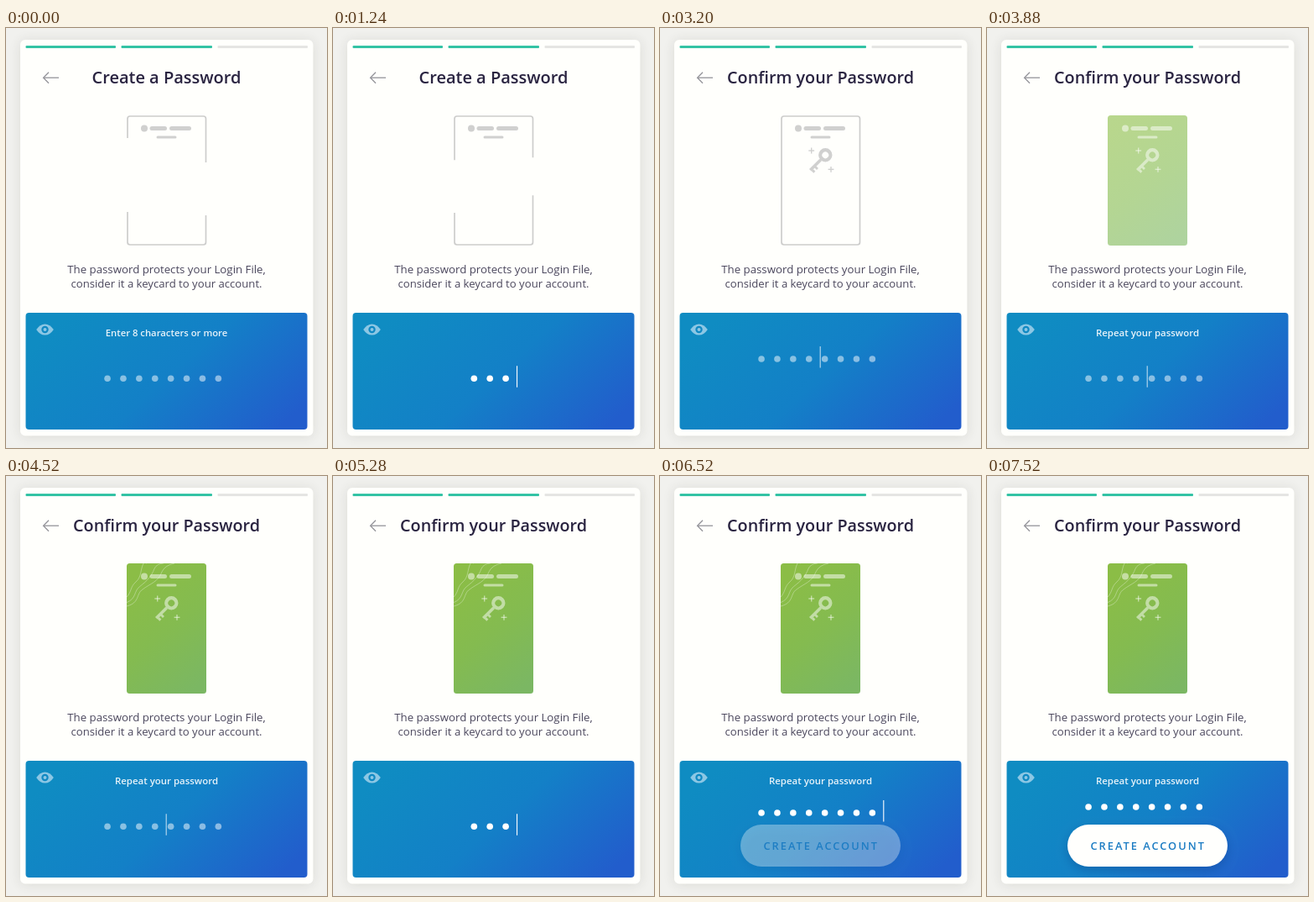
An HTML page with a canvas that plays this animation: 383x500 px, repeating every 7560 ms.

```html
<!DOCTYPE html>
<html lang="en">
<head>
<meta charset="utf-8">
<title>Create a Password</title>
<style>
html, body { margin: 0; width: 100%; height: 100%; overflow: hidden; background: #f1f1ee; }
canvas { display: block; width: 383px; height: 500px; }
</style>
</head>
<body>
<canvas id="stage"></canvas>
<script>
const W = 383, H = 500, LOOP = 7560;
const FONT = '"Open Sans", "Noto Sans", sans-serif';
const KEY_GAP = 215, DOTS = 8;
const ROUND_ONE = 650, ROUND_TWO = 4720, SWAP = 3020;

const canvas = document.getElementById('stage');
const c = canvas.getContext('2d');
const dpr = window.devicePixelRatio || 1;
canvas.width = W * dpr;
canvas.height = H * dpr;

const lerp = (a, b, p) => a + (b - a) * p;
function ease(t, from, to) {
  const u = Math.min(1, Math.max(0, (t - from) / (to - from)));
  return u * u * (3 - 2 * u);
}
// Sum of eased key presses, from 0 to 8
function presses(t, start, dur) {
  let n = 0;
  for (let i = 0; i < DOTS; i++) n += ease(t, start + i * KEY_GAP, start + i * KEY_GAP + dur);
  return n;
}

function withAlpha(a, draw) {
  if (a <= 0) return;
  c.save();
  c.globalAlpha *= a;
  draw();
  c.restore();
}
function box(x, y, w, h, r, fill) {
  c.beginPath();
  c.roundRect(x, y, w, h, r);
  c.fillStyle = fill;
  c.fill();
}
function disc(x, y, r, fill) {
  c.beginPath();
  c.arc(x, y, r, 0, Math.PI * 2);
  c.fillStyle = fill;
  c.fill();
}
function line(points, color, width) {
  c.beginPath();
  points.forEach(([x, y], i) => i ? c.lineTo(x, y) : c.moveTo(x, y));
  c.strokeStyle = color;
  c.lineWidth = width;
  c.stroke();
}
function text(str, x, y, size, weight, color, spacing = 0) {
  c.font = `${weight} ${size}px ${FONT}`;
  c.letterSpacing = spacing + 'px';
  c.textAlign = 'center';
  c.fillStyle = color;
  c.fillText(str, x, y);
  c.letterSpacing = '0px';
}
function gradient(x0, y0, x1, y1, ...colors) {
  const g = c.createLinearGradient(x0, y0, x1, y1);
  colors.forEach((col, i) => g.addColorStop(i / (colors.length - 1), col));
  return g;
}
function shadow(color, blur, dy) {
  c.shadowColor = color;
  c.shadowBlur = blur * dpr;
  c.shadowOffsetY = dy * dpr;
}

function drawCard() {
  c.fillStyle = '#f1f1ee';
  c.fillRect(0, 0, W, H);
  c.save();
  shadow('rgba(60,60,50,.13)', 14, 1);
  box(17, 14, 349.5, 471.5, 6, '#fffffc');
  c.restore();
  box(23.5, 21, 107.5, 3, 1, '#34c3a5');
  box(137.5, 21, 108.5, 3, 1, '#34c3a5');
  box(252.5, 21, 107.5, 3, 1, '#e5e5e3');
  line([[63, 59.2], [45, 59.2]], '#94949a', 1.3);
  line([[51, 52.7], [44.6, 59.2], [51, 65.7]], '#94949a', 1.3);
}

function drawTitle(t) {
  const ink = '#2a2441';
  withAlpha(1 - ease(t, 2800, 2950), () => text('Create a Password', 191.5, 66.3, 20, 600, ink));
  withAlpha(ease(t, 2950, 3120), () => text('Confirm your Password', 191.5, 66.3, 19.8, 600, ink));
  text('The password protects your Login File,', 191.5, 292.3, 13.25, 400, '#4b475d');
  text('consider it a keycard to your account.', 191.5, 309.3, 13.15, 400, '#4b475d');
}

function drawOutline(t) {
  const p = presses(t, ROUND_ONE, 420) / DOTS;
  const L = 145, R = 238.5, T = 105, B = 258, r = 3;
  c.strokeStyle = '#cdcdcc';
  c.lineWidth = 1.7;
  c.beginPath();
  c.moveTo(R, lerp(160, 140, p));
  c.arcTo(R, T, L, T, r);
  c.arcTo(L, T, L, B, r);
  c.lineTo(L, lerp(131, 222.5, p));
  c.moveTo(L, lerp(219, 222.5, p));
  c.arcTo(L, B, R, B, r);
  c.arcTo(R, B, R, T, r);
  c.lineTo(R, lerp(223, 140, p));
  c.stroke();
}

function drawHeader(color) {
  disc(165, 119.4, 4, color);
  box(171.5, 117, 20.5, 5, 2.5, color);
  box(195, 117, 26, 5, 2.5, color);
  box(179.5, 128.4, 24, 3, 1.5, color);
}

function drawSpark(x, y, s, color) {
  if (s <= 0) return;
  line([[x - s, y], [x + s, y]], color, 1.4);
  line([[x, y - s], [x, y + s]], color, 1.4);
}

function drawKey(t, color) {
  withAlpha(ease(t, 2370, 2590), () => {
    c.save();
    c.translate(197.3, 151.3);
    c.rotate(Math.PI * 0.75);
    c.fillStyle = color;
    c.beginPath();
    c.arc(0, 0, 8.2, 0, Math.PI * 2);
    c.arc(0, 0, 3.9, 0, Math.PI * 2, true);
    c.rect(8, -1.8, 17.5, 3.6);
    c.rect(17, -5.2, 2.8, 3.4);
    c.rect(22, -5.2, 3, 3.4);
    c.fill();
    c.restore();
  });
  const s = 3.4 * ease(t, 2360, 2720);
  drawSpark(180.7, 146, s, color);
  drawSpark(204, 168.3, s, color);
}

function drawMarks(t, color) {
  drawHeader(color);
  drawKey(t, color);
}

// Contour lines, spread from the corner outwards
function drawWaves() {
  c.strokeStyle = 'rgba(255,255,255,.32)';
  c.lineWidth = 1;
  for (const p of [0, 0.6, 1]) {
    c.beginPath();
    c.moveTo(144, lerp(144, 155, p));
    c.bezierCurveTo(lerp(150, 160, p), lerp(138, 151, p), lerp(148, 155, p), lerp(132, 140, p),
      lerp(155, 163, p), lerp(126, 135, p));
    c.bezierCurveTo(lerp(162, 172, p), lerp(120, 128, p), lerp(160, 182, p), lerp(112, 126, p),
      lerp(164, 186, p), lerp(104, 114, p));
    c.quadraticCurveTo(lerp(165, 190, p), lerp(102, 106, p), lerp(168, 201, p), 104);
    c.stroke();
  }
}

function drawKeycard(t) {
  withAlpha(1 - ease(t, 3640, 3840), () => {
    drawOutline(t);
    drawMarks(t, '#d0d0cf');
  });
  withAlpha(ease(t, 3720, 4000), () => {
    box(144, 104, 95, 155, 3.5, gradient(146, 125, 237, 245, '#8bbd46', '#84bb50', '#7bb763'));
    c.beginPath();
    c.roundRect(144, 104, 95, 155, 3.5);
    c.clip();
    withAlpha(ease(t, 4000, 4300), drawWaves);
  });
  withAlpha(0.5 * ease(t, 3660, 3860), () => drawMarks(t, '#fff'));
}

function drawEye() {
  const x = 46.5, y = 359;
  c.fillStyle = '#8cc7e4';
  c.beginPath();
  c.moveTo(x - 10.3, y);
  c.quadraticCurveTo(x - 6, y - 6.6, x, y - 6.6);
  c.quadraticCurveTo(x + 6, y - 6.6, x + 10.3, y);
  c.quadraticCurveTo(x + 6, y + 6.6, x, y + 6.6);
  c.quadraticCurveTo(x - 6, y + 6.6, x - 10.3, y);
  c.fill();
  disc(x, y, 4.2, '#0f89c3');
  disc(x, y, 2, '#8cc7e4');
}

function drawLabels(t) {
  const first = 1 - ease(t, 470, 640) + ease(t, 2395, 2600) - ease(t, 2800, 2960);
  const second = ease(t, 3300, 3550) - ease(t, 4550, 4710) + ease(t, 6300, 6480);
  const color = 'rgba(255,255,255,.9)';
  withAlpha(first, () => text('Enter 8 characters or more', 191.5, 367.3, 11.3, 600, color));
  withAlpha(second, () => text('Repeat your password', 191.5, 367.3, 11.45, 600, color));
}

function drawDots(n, y, alpha) {
  const count = Math.ceil(n - 1e-6);
  withAlpha(alpha, () => {
    for (let i = 0; i < count; i++) {
      const grow = Math.min(1, n - i);
      disc(187.2 + (i - (n - 1) / 2) * 18.9, y, 3.8 * grow, '#fff');
    }
  });
}

function drawEntry(t) {
  const late = t >= SWAP;
  const start = late ? ROUND_TWO : ROUND_ONE;
  const typed = presses(t, start, 120);
  const lift = ease(t, 2280, 2580) - ease(t, 3300, 3600) + ease(t, 6330, 6630);
  const y = 417.3 - 23.3 * lift;

  // Empty slots before typing, white dots after
  drawDots(DOTS, y, 0.5 * (1 - ease(t, start - 120, start)));
  drawDots(typed, y, 1 - 0.5 * (late ? 0 : ease(t, 2880, SWAP)));

  const caret = late
    ? ease(t, 3040, 3180) * (0.72 + 0.28 * ease(t, 4600, 4720)) - ease(t, 6700, 6800)
    : 0.72 * ease(t, 200, 380) + 0.28 * ease(t, 530, 650) - ease(t, 2860, 2990);
  withAlpha(caret, () => {
    const x = 191.2 + typed * 9.45;
    line([[x, y - 15], [x, y + 10.5]], '#fff', 1.1);
  });
}

function drawButton(t) {
  withAlpha(ease(t, 6420, 6680), () => {
    c.save();
    shadow('rgba(10,40,110,.28)', 12, 4);
    box(96, 415, 191, 50, 25, '#fffffd');
    c.restore();
  });
  withAlpha(ease(t, 6400, 6540), () => {
    text('CREATE ACCOUNT', 192.2, 444.8, 12.8, 600, '#1a7bc3', 2);
  });
}

function drawPanel(t) {
  box(23.5, 339, 336, 139, 4, gradient(120, 300, 300, 500, '#0f8cc2', '#1380c7', '#225dcc'));
  drawEye();
  drawLabels(t);
  drawEntry(t);
  drawButton(t);
}

const origin = performance.now();
function render() {
  const t = (performance.now() - origin) % LOOP;
  c.setTransform(dpr, 0, 0, dpr, 0, 0);
  drawCard();
  drawTitle(t);
  drawKeycard(t);
  drawPanel(t);
  requestAnimationFrame(render);
}
render();
</script>
</body>
</html>
```
